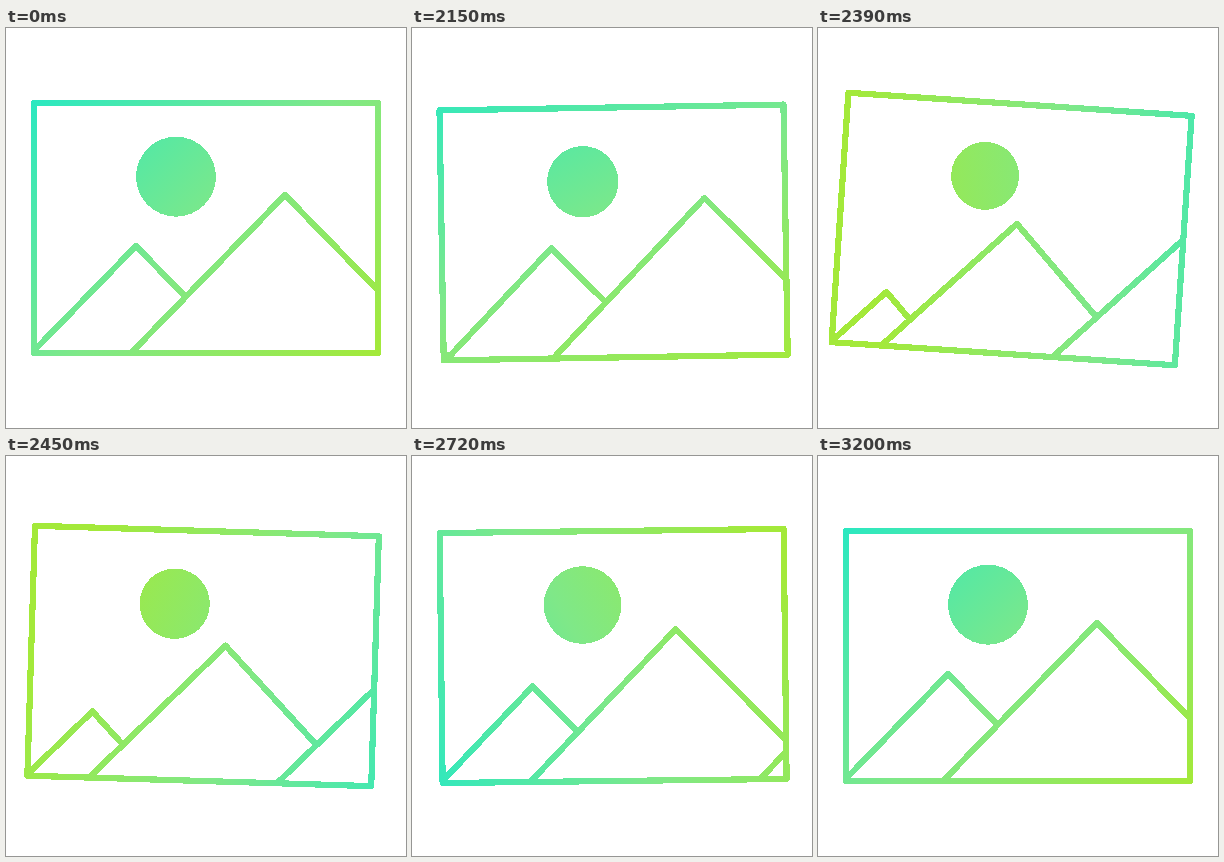
Write an HTML page that moves like this. It is 400x400 px and loops after 3.23 s.

```html
<!DOCTYPE html>
<html lang="en">
<head>
<meta charset="utf-8">
<title>Picture icon</title>
<style>
  html, body { margin: 0; height: 100%; overflow: hidden; background: #fff; }
  svg { display: block; width: 100vw; height: 100vh; shape-rendering: crispEdges; }
</style>
</head>
<body>
<svg viewBox="0 0 400 400">
  <defs>
    <linearGradient id="tint" gradientUnits="userSpaceOnUse">
      <stop offset="0" stop-color="#2ce8c0"/>
      <stop offset=".5" stop-color="#7fe888"/>
      <stop offset="1" stop-color="#a3e93a"/>
    </linearGradient>
    <clipPath id="inside"><rect x="28" y="75" width="344" height="250"/></clipPath>
  </defs>
  <g id="picture" fill="none" stroke="url(#tint)" stroke-width="6.2" stroke-linejoin="round" stroke-linecap="round">
    <circle id="sun" cx="170" cy="148.7" r="40" fill="url(#tint)" stroke="none"/>
    <path id="hills" clip-path="url(#inside)"/>
    <rect x="28" y="75" width="344" height="250"/>
  </g>
</svg>
<script>
  const LOOP = 3230, REST = 2030, STEP = 30;
  const START = 2000, SPAN = 1200;
  const GROUND = 325, SLOPE = 1.026, REACH = 420;
  const $ = id => document.getElementById(id);
  const picture = $('picture'), sun = $('sun'), hills = $('hills'), tint = $('tint');

  const clamp = u => Math.min(1, Math.max(0, u));
  const mix = (a, b, u) => a + (b - a) * u;
  const sine = u => (1 - Math.cos(Math.PI * clamp(u))) / 2;

  // Same curve as cubic-bezier(x1, 0, x2, 1), solved by bisection.
  function ease(u, x1, x2) {
    let lo = 0, hi = 1;
    for (let i = 0; i < 24; i++) {
      const s = (lo + hi) / 2, r = 1 - s;
      if (3 * x1 * s * r * r + 3 * x2 * s * s * r + s * s * s < u) lo = s;
      else hi = s;
    }
    return lo * lo * (3 - 2 * lo);
  }

  // Turning points [ms, degrees] of the swing: wind up, throw, settle.
  const swing = [[0, 0], [100, -1.9], [310, 5.1], [600, -2], [860, 1], [1100, -.4], [1200, 0]];

  function tilt(ms) {
    const i = swing.findIndex(point => point[0] > ms);
    if (i < 1) return 0;
    const [t0, a] = swing[i - 1], [t1, b] = swing[i];
    return mix(a, b, sine((ms - t0) / (t1 - t0)));
  }

  // A hill runs from the ground over its peak, then down to the flank of the next one.
  function hill([x, y], next) {
    const foot = x - (GROUND - y) / SLOPE;
    const endX = next ? (x + next[0]) / 2 + (next[1] - y) / (2 * SLOPE) : x + (GROUND - y) / SLOPE;
    return `M${foot} ${GROUND}L${x} ${y}L${endX} ${y + SLOPE * (endX - x)}`;
  }

  function draw(ms) {
    const u = clamp(ms / SPAN);
    const slide = ease(u, .38, .15), rise = ease(u, .32, .26);

    const drop = 6.5 * (sine(ms / 240) - sine((ms - 240) / 210));
    picture.setAttribute('transform', `translate(0 ${drop}) rotate(${tilt(ms)} 200 105)`);

    const shrink = sine(ms / 290) * (1 - clamp((ms - 290) / 690)) ** 2;
    sun.setAttribute('r', 40 - 8.2 * shrink);

    // Every hill moves one place to the right; a new one grows out of the corner.
    const peaks = [
      [mix(28, 130, slide), mix(GROUND, 218, slide)],
      [mix(130, 279, slide), mix(218, 167, rise)],
      [279 + 247 * slide, 167]
    ];
    hills.setAttribute('d', peaks.map((p, i) => hill(p, peaks[i + 1])).join(''));

    // The gradient makes one full turn and leans towards lime on the way.
    const angle = Math.PI * (.25 + 2 * ease(u, .33, .42));
    const lean = .16 * Math.sin(Math.PI * slide);
    [-.5, .5].forEach((end, i) => {
      const r = REACH * (end - lean);
      tint.setAttribute('x' + (i + 1), 200 + r * Math.cos(angle));
      tint.setAttribute('y' + (i + 1), 200 + r * Math.sin(angle));
    });
  }

  function tick() {
    const t = performance.now() % LOOP;
    draw(t < REST ? 0 : REST - START + Math.floor((t - REST) / STEP) * STEP);
    requestAnimationFrame(tick);
  }
  tick();
</script>
</body>
</html>
```
